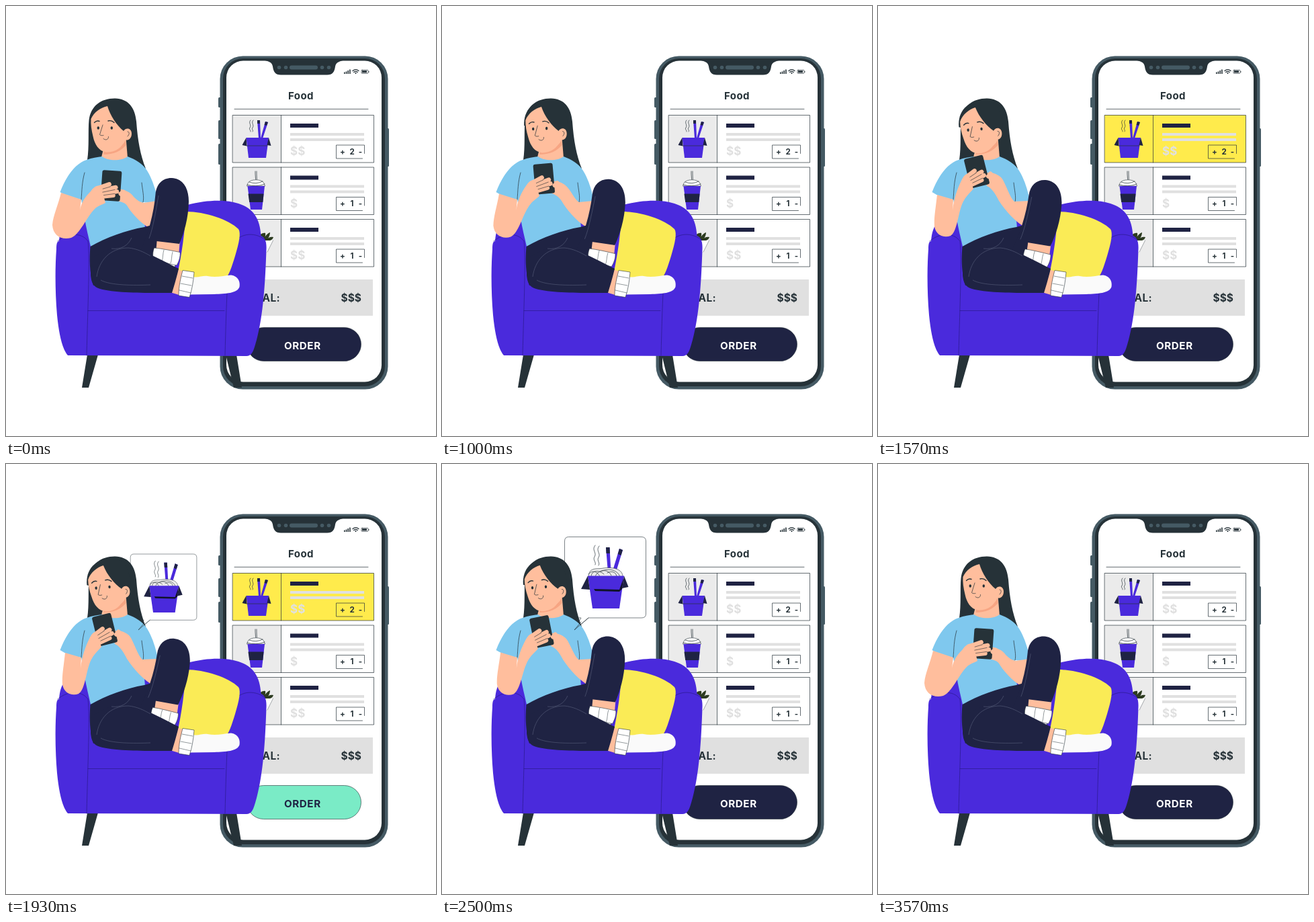
Recreate the animation shown at these times as an HTML page. Size 640x640 px, loop 3640 ms.

```html
<!DOCTYPE html>
<html lang="en">
<head>
<meta charset="utf-8">
<title>Food order</title>
<style>
html, body { margin: 0; width: 100%; height: 100%; overflow: hidden; background: #fff; }
svg { display: block; width: 100vw; height: 100vh; }
text { font-family: Inter, "Open Sans", sans-serif; font-weight: 700; fill: #263238; }
.mid { text-anchor: middle; }
.dark { fill: #263238; }
.slate { fill: #455a64; }
.navy { fill: #1f2343; }
.violet { fill: #4a2adc; }
.skin { fill: #ffbe9d; }
.sky { fill: #7fc8ee; }
.grey { fill: #e0e0e0; }
.white { fill: #fff; }
.line { fill: none; stroke: #263238; stroke-width: .7; stroke-linecap: round; stroke-linejoin: round; }
.seam { fill: none; stroke: #59607c; stroke-width: .6; }
.edge { stroke: #263238; stroke-width: .6; stroke-linejoin: round; }
</style>
</head>
<body>
<svg viewBox="0 0 640 640">
  <!-- big phone -->
  <g class="slate">
    <rect x="316" y="136" width="5" height="15" rx="1.5"/>
    <rect x="316" y="170" width="5" height="28" rx="1.5"/>
    <rect x="316" y="205" width="5" height="31" rx="1.5"/>
    <rect x="565" y="182" width="5" height="57" rx="1.5"/>
    <rect x="318.5" y="74.5" width="250" height="496" rx="34"/>
  </g>
  <rect class="dark" x="323" y="78" width="241" height="488" rx="30"/>
  <rect class="white" x="328" y="81.5" width="231" height="478" rx="25"/>
  <path class="dark" d="M381 80H505C498 82 491 83 490 90C489 98 486 102.5 478 102.5H409C401 102.5 398 98 397 90C396 83 390 82 381 80Z"/>
  <g class="slate">
    <rect x="422" y="88.5" width="42" height="6" rx="3"/>
    <circle cx="406.5" cy="91.5" r="2.8"/><circle cx="416.5" cy="91.5" r="2.8"/>
    <circle cx="470.5" cy="91.5" r="2.8"/><circle cx="480.5" cy="91.5" r="2.8"/>
  </g>
  <path class="dark" d="M503 98.5h1.6v2.5h-1.6zM505.7 97.5h1.6v3.5h-1.6zM508.4 96h1.6v5h-1.6zM511.1 94.5h1.6v6.5h-1.6z"/>
  <path class="line" style="stroke-width:1.3" d="M516 96.5Q520.5 92.7 525 96.5M517.7 98.6Q520.5 96.3 523.3 98.6"/>
  <circle class="dark" cx="520.5" cy="100" r="1.1"/>
  <rect class="line" x="529" y="95.3" width="10" height="5" rx="1"/>
  <path class="dark" d="M530 96.3h7v3h-7zM539.4 97h1v1.7h-1z"/>
  <text class="mid" x="439" y="139" font-size="15" letter-spacing=".4">Food</text>
  <path class="line" d="M340 153.4H539"/>
  <g id="rows"></g>
  <rect class="grey" x="337" y="407" width="209" height="54"/>
  <text x="408" y="440" font-size="15.5" letter-spacing=".3" text-anchor="end">TOTAL:</text>
  <text x="529" y="439.5" font-size="15.5" text-anchor="end">$$$</text>
  <rect id="button" x="358.5" y="478.5" width="170" height="50" rx="25" class="edge"/>
  <text id="order" class="mid" x="441.3" y="511" font-size="15.2" letter-spacing=".6">ORDER</text>

  <!-- armchair -->
  <path class="dark" d="M121 519H137L123 568H113ZM327 519H343L351 568H339Z"/>
  <path class="violet" d="M79 350C80 338 82 328 92 318L130 296H270C300 288 328 288 346 294C368 301 378 316 379.5 342C386 344 388 352 387.5 362C386 410 383 460 373 497C369 511 367 521 358 521L92 520C84 511 79 490 76 460C73 425 73 390 75 362C75 354 76 350 79 350Z"/>
  <g class="line" style="stroke:#2a1a8c">
    <path d="M77 350C90 338 112 336 122 350C125 375 122 440 120 520M122 453.5H325"/>
    <path d="M386 348C368 334 346 340 338 354C330 372 328 440 326 520"/>
  </g>
  <path fill="#faeb56" d="M268 306C296 306 332 318 346 332C350 338 347 352 341 372C336 388 332 402 324 409L254 404C262 370 266 335 268 306Z"/>

  <!-- bubble -->
  <g class="pop">
    <path class="white edge" d="M188.5 108.5H297Q303.5 108.5 303.5 115V223Q303.5 229 297 229H218L197 247L207 229H188.5Q182.5 229 182.5 223V115Q182.5 108.5 188.5 108.5Z"/>
    <path class="line" d="M228 121C222 128 231 132 227 138C224 143 230 146 228 150M234 122C228 129 237 133 233 139C230 144 236 147 233 151"/>
    <path class="violet" d="M244 124H249.5L251.5 162H247ZM264 126L269 128L258 164L253 162Z"/>
    <path class="navy" d="M244 124H249.5L250 133H244.5ZM264 126L269 128L266.5 136L261.7 134Z"/>
    <path d="M218 169C218 152 232 157 240 155C254 153 270 156 269 169Z" fill="#ebebeb" class="edge"/>
    <path class="line" d="M222 168C222 157 235 158 241 164M228 168C230 158 247 154 252 166M236 160C248 154 262 158 265 168M246 162C254 158 260 162 260 168M218 164C224 157 232 160 235 168"/>
    <path class="violet" d="M217 166.5L271 166.5L264 215H224Z"/>
    <path class="navy" d="M217 166.5L207 186L220 187ZM271 166.5L277.5 183L268 185Z"/>
    <path d="M226 186L264 187L270 170L268 186L264 190L228 189Z" fill="#10122b"/>
  </g>

  <!-- woman -->
  <path class="dark" d="M121 229C124 210 122 185 123.5 170C126 149 141 137.5 162 137.5C182 138 192 151 194 172C196 200 200 222 208 242C198 238 190 233 178 229Z"/>
  <path class="skin" d="M147 205L178 190L181 226C172 233 152 232 142 225Z"/>
  <path fill="#f7a583" d="M146 216C160 217 172 210 178 200L178.5 207C171 216 160 221 145.5 221Z"/>
  <g id="head">
    <path class="dark" d="M124 176C124 152 140 139 162 139C184 140 190 160 189 186L176 194Z"/>
    <path class="skin" d="M126.5 168C131 158 141 151 151 149C155 163 165 178 175 186C179 180 187 182 187 190C187 198 181 201 177 199C173 211 163 218 149 217.5C138 216 132 206 129.5 194C127 184 126 176 126.5 168Z"/>
    <path class="line" d="M144 177L139.5 191.5C141 193 143 193 145 192.5M145 197.5C149 201 153 198 152.5 194.5M181 187C184 187 184 191 181 194"/>
    <path class="line" style="stroke-width:1.4" d="M131.5 173.5Q135 170 139 171.5M152 171Q157 169.5 161 173.5"/>
    <ellipse class="dark" cx="137.3" cy="181.5" rx="1.7" ry="2.3"/>
    <ellipse class="dark" cx="157.3" cy="181.5" rx="1.7" ry="2.3"/>
  </g>
  <path class="sky" d="M120 229C128 226 136 225 143 224C152 231 172 231 181 224C192 228 204 235 210 245C218 258 223 274 226 290C219 293 211 293 204 292L207 331L126 358C124 348 119 330 117 315L112 288C100 287 88 282 80.5 277C90 252 104 234 120 229Z"/>
  <path class="line" d="M117 248C113 262 113 275 112 288M202 263C203 274 206 284 204 292"/>
  <g class="pop"><path class="line" d="M218 229L197 247L207 235"/></g>
  <path id="armR" class="skin"/>
  <rect id="phone" class="dark" x="-14.5" y="-22.5" width="29" height="45" rx="3"/>
  <path id="armL" class="skin"/>
  <g id="hand" class="line" style="stroke:#ffbe9d;stroke-width:6.4">
    <path d="M-17 4L-3 -2M-18 9L7 2M-16 13L9 8M-12 17L4 14M19 8L15 11"/>
    <path style="stroke:#263238;stroke-width:.6" d="M-12 5.500L-1 1.500M-12 10.500L6 5.500M-10 14.800L6 11.500"/>
  </g>
  <path class="navy" d="M125.5 358C150 344 178 334 206 329L232 322L226 370L212 390L130 416C124 396 124 376 125.5 358Z"/>
  <g id="leg">
    <path class="skin" d="M225 345L259 347L257 372L223 368Z"/>
    <path class="white edge" d="M221 372L255 380L249 392L233 386Z"/>
    <path class="white edge" d="M220.5 360C232 361 246 364 259 366.5C260 373 257 381 254 386C242 384 228 379 219 375.5C218 370 219 364 220.5 360Z"/>
    <path class="line" style="stroke-width:.5" d="M235 363C233 369 234 375 232 380M248 366C246 372 247 379 245 383"/>
    <path class="navy" d="M198 369C212 340 220 308 222.5 280C224 264 234 255.5 247 256C264 257 272 272 272 291C271.5 316 265 338 258 354L224 350L216 372Z"/>
    <path class="seam" d="M227 282C223 305 219 330 213 346"/>
  </g>
  <path class="skin" d="M250 390L266 396L261 431L244 426Z"/>
  <path class="navy" d="M126 378C135 368 160 355 186 360C212 366 236 381 257 391C254 404 250 417 247 427C215 427 165 428 140 421C130 418 127 412 126 400Z"/>
  <path class="seam" d="M135 403C138 380 154 360 182 360C194 361 205 366 215 372M157 361C172 363 182 356 187 345M141 408C155 416 190 416 215 415"/>
  <path fill="#fafafa" d="M276 402C284 406 291 401 300 402C313 405 325 401 335 400.5C345 402 349 410 347.5 418C344 428 327 428 310 429L272 429.5Z"/>
  <path class="white edge" d="M263 393.5L280 396C279 409 277 422 273 433.5L257 431C257 417 260 405 263 393.5Z"/>
  <path class="line" style="stroke-width:.5" d="M262 402L278 405M260 413L276 416M258 423L275 427"/>
</svg>
<script>
const LOOP = 3640;
const $ = id => document.getElementById(id);

const icons = [
  `<path class="line" d="M364 170C360 174 366 177 363 181C361 184 365 185 364 187M368 170C364 174 370 177 367 181C365 184 369 185 367 187"/>
   <path class="violet" d="M374 170H378L379 197H376ZM386 172L390 173L382 197H379Z"/>
   <path class="navy" d="M374 170H378V175H374ZM386 172L390 173L388 178L384.5 177Z"/>
   <path class="violet" d="M357.5 196H391L387 226H361Z"/>
   <path class="navy" d="M357.5 196L351.5 207L358.5 208.5ZM391 196L394.5 208L388.5 207Z"/>
   <path class="line" d="M358.5 208H389"/>`,
  `<path class="line" d="M371 246V250L372 263M373 246V250L373.5 263"/>
   <path class="white edge" d="M360 264C362 257 382 257 384 264L385.5 268H358.5Z"/>
   <path class="line" d="M359 266Q372 270 385 265M362 262Q372 266 382 261"/>
   <path class="violet" d="M359.5 268H385L381 303H364Z"/>
   <path class="navy" d="M360.5 279.5H383.5L382.3 292H362.2Z"/>`,
  `<path fill="#2c3b20" d="M374 349C375 342 381 337 386 338C387 343 384 347 381 349ZM383 349C385 342 390 338 393 337C393 342 390 346 388 349ZM387 349C390 344 394 343 398 344C397 348 393 349 390 350Z"/>
   <path class="white" d="M352 349H397.5L389 366H361Z"/>
   <path class="line" style="stroke-width:.4" d="M397.5 349L389 366"/>`
];

$('rows').innerHTML = icons.map((icon, i) => {
  const y = 162.5 + i * 77.5;
  const base = y + 58;
  return `<rect x="337.5" y="${y}" width="210" height="70.5" fill="#fff"/>
    <rect class="panel" x="337.5" y="${y}" width="72" height="70.5" fill="#ebebeb"/>
    <rect class="line" x="337.5" y="${y}" width="210" height="70.5"/>
    <path class="line" d="M409.5 ${y}v70.5"/>${icon}
    <rect class="navy" x="423" y="${y + 12.5}" width="42" height="6"/>
    <rect class="grey" x="423" y="${y + 26.5}" width="110" height="4"/>
    <rect class="grey" x="423" y="${y + 34.5}" width="110" height="4"/>
    <text x="423" y="${y + 59.5}" font-size="17" style="fill:#e0e0e0">${i === 1 ? '$' : '$$'}</text>
    <path class="line" d="M533.5 ${y + 57}v-12.5h-42v20h39"/>
    <g class="mid" font-size="11.5"><text x="501" y="${base}">+</text><text x="515" y="${base}">${i ? 1 : 2}</text><text x="527.5" y="${base}">-</text></g>`;
}).join('');

const card = $('rows').querySelector('rect');
const panel = $('rows').querySelector('.panel');
const pops = document.querySelectorAll('.pop');

// resting and lifted outlines
const arms = {
  armL: [
    'M82 278C78 295 70 312 69 326C70 342 83 349 97 345C110 340 120 314 132 302C137 297 143 296 148 293L142 270C137 264 130 270 126 276C118 284 112 292 110 304L112 288Z',
    'M88 281C86 300 83 316 84 328C86 341 98 346 108 342C117 337 119 312 124 298C128 286 135 280 142 272L134 250C130 250 127 254 125 258C118 272 113 286 111 304L112 288Z'],
  armR: [
    'M166 272C178 273 186 278 190 284C196 290 200 292 205 293L225 290L222 335C205 328 190 312 182 300C178 292 172 292 166 290Z',
    'M158 249C168 246 178 250 184 256C190 264 196 285 203 291L225 290L220 330C205 322 190 305 180 290C174 278 168 270 162 268Z']
};

const mix = (a, b, p) => a + (b - a) * p;
const span = (t, from, to) => Math.min(1, Math.max(0, (t - from) / (to - from)));
const sine = p => (1 - Math.cos(Math.PI * p)) / 2;

function morph([a, b], p) {
  const ends = b.match(/[\d.]+/g);
  let i = 0;
  return a.replace(/[\d.]+/g, n => mix(+n, +ends[i++], p).toFixed(2));
}

function draw(t) {
  const lift = sine(span(t, 490, 1520)) - sine(span(t, 2210, 3380));
  const sway = 3.5 * Math.abs(Math.sin(Math.PI * 3 * t / LOOP)) ** 1.3;
  const grow = (1 - (1 - span(t, 1750, 2170)) ** 3) * (1 - span(t, 3070, 3400) ** 3);
  const picked = t >= 1430 && t < 2400;
  const pressed = t >= 1850 && t < 2400;

  for (const id in arms) $(id).setAttribute('d', morph(arms[id], lift));
  const hold = `translate(${mix(156.5, 147, lift)} ${mix(267.5, 246.5, lift)}) rotate(${mix(4, -14, lift)})`;
  $('phone').setAttribute('transform', hold);
  $('hand').setAttribute('transform', hold);
  $('head').setAttribute('transform', `rotate(${-5 * lift} 172 220)`);
  $('leg').setAttribute('transform', `rotate(${sway} 181 323)`);
  for (const p of pops) {
    p.setAttribute('transform', `translate(197 247) scale(${grow}) translate(-197 -247)`);
    p.style.display = grow > 0.01 ? '' : 'none';
  }
  card.style.fill = picked ? '#ffeb4c' : '#fff';
  panel.style.fill = picked ? '#ffeb4c' : '#ebebeb';
  $('button').style.fill = pressed ? '#7aebc6' : '#1f2343';
  $('order').style.fill = pressed ? '#1f2343' : '#fff';
}

const start = performance.now();
function tick() {
  draw((performance.now() - start) % LOOP);
  requestAnimationFrame(tick);
}
tick();
</script>
</body>
</html>
```
